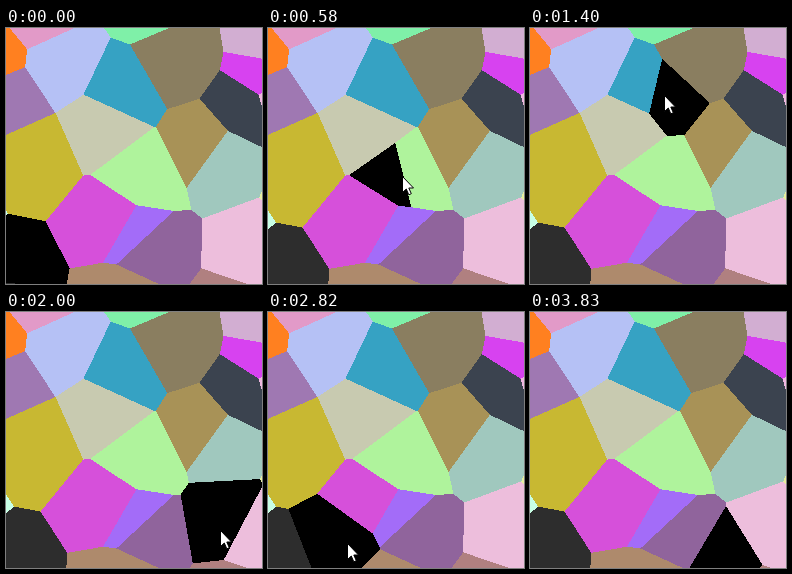
An HTML page with a canvas for the animation above (5.04 s loop, 256 by 256 pixels).

```html
<!DOCTYPE html>
<html lang="en">
<head>
<meta charset="utf-8">
<title>Voronoi cells</title>
<style>
html, body { margin: 0; width: 100%; height: 100%; overflow: hidden; background: #000; }
canvas { display: block; width: 256px; height: 256px; }
</style>
</head>
<body>
<canvas id="stage" width="256" height="256"></canvas>
<script>
const SIZE = 256, LOOP = 5040;
const ctx = document.getElementById('stage').getContext('2d');

// Fixed sites: x, y, colour
const sites = [
  [-18.5, 27, 0xff8020], [34, -16.5, 0xe29ac8], [57.5, 35.5, 0xb5c1f5],
  [145, -26, 0x7ff0a8], [113, 62, 0x36a2c3], [168.5, 30, 0x8a7e60],
  [265, 14, 0xd2aed2], [259, 48.5, 0xd742f0], [239, 80, 0x3b434f],
  [197, 117, 0xa89257], [136, 147.5, 0xaff39c], [215, 130, 0xa0c8be],
  [97.5, 96, 0xc8cab0], [0.5, 73, 0x9f78b2], [25, 128, 0xc8b832],
  [105.5, 194, 0xd650da], [127, 206.5, 0xa36cf8], [140.5, 221, 0x90649c],
  [249.5, 223, 0xedbedc], [118.5, 269, 0xae8a6c], [228, 286.5, 0xb08080],
  [0, 262, 0x2d2d2d], [-60, 185, 0xc8ffe6], [307, 168, 0xe8f0a0],
  [270.3, 71, 0xf0b8e0]
];

// Black site over time: start, x, y, then the pointer tip where it runs ahead
const moves = [
  [0, 1, 247], [200, 160, 163], [360, 148, 145], [580, 134, 148],
  [780, 99, 142], [980, 78, 140], [1180, 70, 93], [1400, 134, 67],
  [1600, 221, 92], [1800, 234, 116], [2000, 219, 207, 214, 218],
  [2200, 193, 232], [2400, 133, 233], [2620, 84, 248], [2820, 79, 231],
  [3020, 78, 229], [3220, 72, 161], [3430, 74, 160],
  [3630, 118.5, 208.5, 125, 215], [3830, 198, 255]
];

const arrow = new Path2D('M.5 .5V16.5L4.3 13L6.8 18.8L9.3 17.7L6.8 12H11.5Z');

function drawCells(x0, y0) {
  const all = [...sites, [x0, y0, 0]];
  const image = ctx.createImageData(SIZE, SIZE);
  const pixels = new DataView(image.data.buffer);
  for (let y = 0, i = 0; y < SIZE; y++) {
    for (let x = 0; x < SIZE; x++, i += 4) {
      let best = Infinity, colour = 0;
      for (const [sx, sy, c] of all) {
        const d = (x - sx) ** 2 + (y - sy) ** 2;
        if (d < best) { best = d; colour = c; }
      }
      pixels.setUint32(i, colour * 256 + 255);
    }
  }
  ctx.putImageData(image, 0, 0);
}

function drawPointer(x, y) {
  ctx.save();
  ctx.translate(Math.round(x), Math.round(y));
  ctx.fillStyle = '#fff';
  ctx.strokeStyle = '#000';
  ctx.fill(arrow);
  ctx.stroke(arrow);
  ctx.restore();
}

let shown = -1;
function frame(now) {
  const t = now % LOOP;
  const step = moves.findLastIndex(m => m[0] <= t);
  if (step !== shown) {
    shown = step;
    const [, x, y, tipX = x, tipY = y] = moves[step];
    drawCells(x, y);
    if (step > 0 && step < moves.length - 1) drawPointer(tipX, tipY);
  }
  requestAnimationFrame(frame);
}
frame(0);
</script>
</body>
</html>
```
